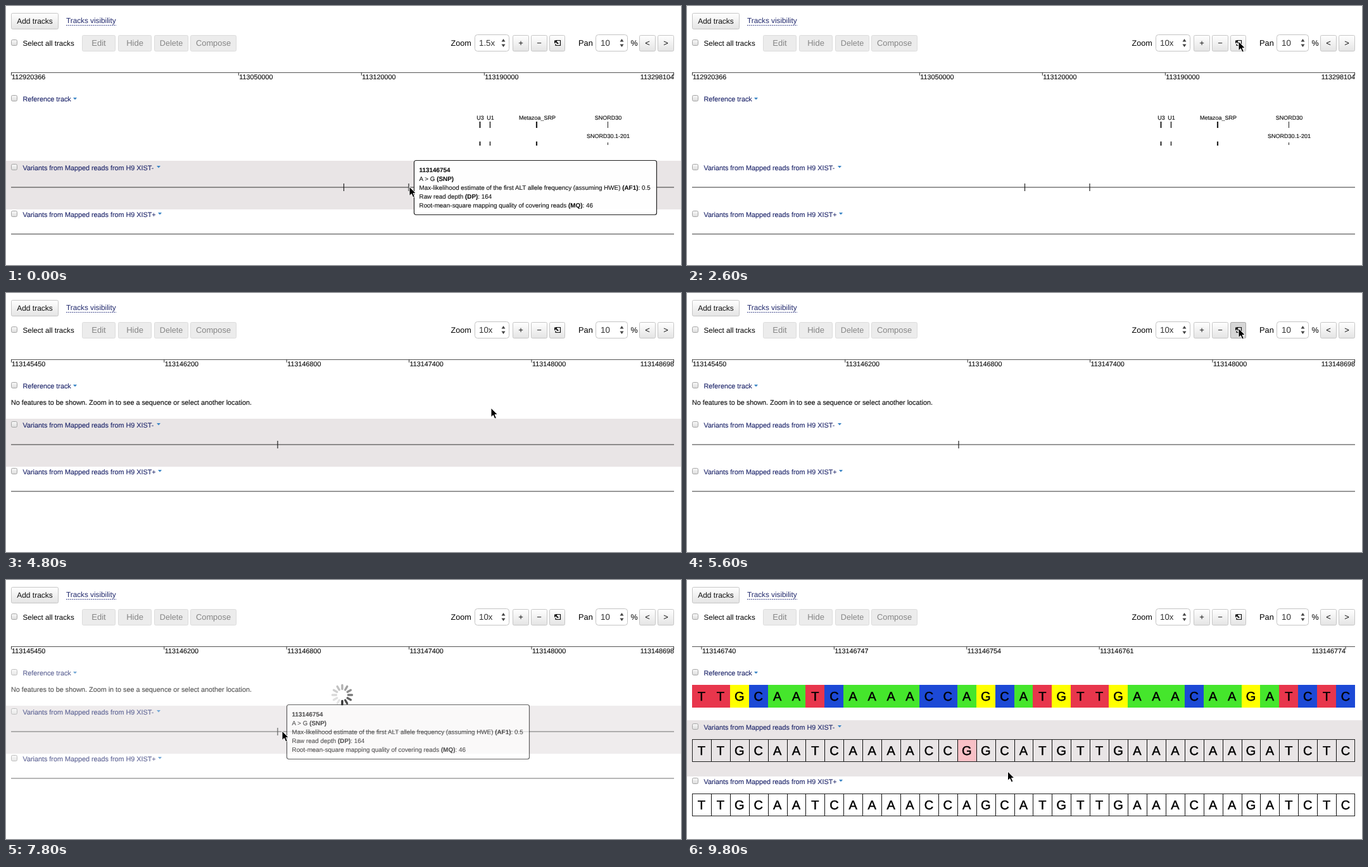
These frames come from a looping animation (1066 by 410 pixels, 10000 ms). An HTML page:

```html
<!DOCTYPE html>
<html lang="en">
<head>
<meta charset="utf-8">
<title>Genome browser</title>
<style>
html, body { margin: 0; width: 100%; height: 100%; overflow: hidden; background: #fff; }
svg { display: block; width: 1066px; height: 410px; cursor: default; }
text { font-family: "Liberation Sans", Arial, sans-serif; text-rendering: geometricPrecision; white-space: pre; }
.title { font-size: 10.8px; fill: #20286c; stroke: #20286c; stroke-width: .15; }
.tick { font-size: 10.8px; fill: #111; stroke: #111; stroke-width: .15; }
.gene { font-size: 9px; fill: #111; stroke: #111; stroke-width: .15; text-anchor: middle; }
.base { font-size: 20px; fill: #000; stroke: #000; stroke-width: .5; text-anchor: middle; }
.tip { font-size: 9.9px; fill: #111; stroke: #111; stroke-width: .1; }
</style>
</head>
<body>
<svg id="stage" viewBox="0 0 1066 410">
  <defs>
    <linearGradient id="btn" x2="0" y2="1"><stop stop-color="#fff"/><stop offset="1" stop-color="#e4e4e4"/></linearGradient>
    <linearGradient id="box" x2="0" y2="1"><stop stop-color="#f8f8f8"/><stop offset="1" stop-color="#dcdcdc"/></linearGradient>
    <filter id="shade" x="-20%" y="-20%" width="140%" height="150%"><feDropShadow dx="0" dy="2" stdDeviation="3" flood-opacity=".35"/></filter>
  </defs>
</svg>
<script>
const LEFT = 8, WIDTH = 1047, RIGHT = LEFT + WIDTH, STEP = 200, LOOP = 10000;
const stage = document.getElementById('stage');

const text = (x, y, s, attrs = '') => `<text x="${x}" y="${y}" ${attrs}>${s}</text>`;
const rect = (x, y, w, h, attrs = '') => `<rect x="${x}" y="${y}" width="${w}" height="${h}" ${attrs}/>`;
const line = (x1, y1, x2, y2, color = '#222', w = 1) =>
  `<path d="M${x1} ${y1}L${x2} ${y2}" stroke="${color}" stroke-width="${w}"/>`;
const group = (id, body, attrs = '') => `<g id="${id}" ${attrs}>${body}</g>`;
const check = y => rect(8.5, y - 4.5, 9, 9, 'rx="2" fill="url(#box)" stroke="#a5a5a5"');
const caret = (x, y) => `<path d="M${x - 3} ${y - 2}h6l-3 3.6z" fill="#3b86c6"/>`;

/* toolbar */
function button(x, y, w, label, size, on = true) {
  const look = on ? 'fill="url(#btn)" stroke="#c6c6c6"' : 'fill="#ececec" stroke="#dcdcdc"';
  return rect(x + .5, y + .5, w - 1, 25, `rx="2" ${look}`) +
    text(x + w / 2, y + 17, label, `font-size="${size}" text-anchor="middle" fill="${on ? '#111' : '#868686'}"`);
}
function select(x, w, label) {
  const ax = x + w - 9.5;
  return rect(x + .5, 45.5, w - 1, 26, 'rx="4" fill="#fff" stroke="#c4c4c4"') + label +
    `<path d="M${ax - 3} 56.5h6l-3 -4.5zM${ax - 3} 60.5h6l-3 4.5z" fill="#444"/>`;
}
const toolbar =
  button(8, 11, 75, 'Add tracks', 12) +
  text(95, 26.9, 'Tracks visibility', 'font-size="11.75" fill="#20286c"') +
  `<path d="M95 30.5H174" stroke="#4a5292" stroke-dasharray="2 1"/>` +
  check(58) + text(26.5, 63, 'Select all tracks', 'font-size="11.6"') +
  button(120, 46, 53, 'Edit', 13, false) + button(177, 46, 53, 'Hide', 13, false) +
  button(234, 46, 54, 'Delete', 12.6, false) + button(291, 46, 73, 'Compose', 12.9, false) +
  text(702.5, 63, 'Zoom', 'font-size="12.6"') +
  select(740, 55, text(747, 62.5, '', 'id="zoom" font-size="13.3" fill="#333"')) +
  button(800, 46, 26, '+', 13) + button(829, 46, 26, '−', 13) + button(858, 46, 25, '', 13) +
  rect(858.5, 46.5, 24, 25, 'id="pressed" rx="2" fill="#d6d6d6" stroke="#a8a8a8"') +
  `<path d="M868 54.5H875.5V62.5H868V60" fill="none" stroke="#111" stroke-width="1.2"/>
   <path d="M866 54.5H871L869.6 56 872.8 59.2 871.4 60.6 868.2 57.4 866 59.5Z" fill="#111"/>` +
  text(904, 63, 'Pan', 'font-size="12.8"') +
  select(931, 51, text(939, 62.5, '10', 'font-size="13.3" fill="#333"')) +
  text(986.5, 63, '%', 'font-size="12.6"') +
  button(1000, 46, 26, '&lt;', 13) + button(1029, 46, 26, '&gt;', 13);

/* tracks */
function ruler(id, lo, hi, marks) {
  const labels = marks.map((v, i) => {
    const x = LEFT + (v - lo) / (hi - lo) * WIDTH, last = i === marks.length - 1;
    const tx = Math.min(Math.max(x, 8.5), RIGHT - .5);
    return line(tx, 105, tx, 110, '#333') +
      text(last ? x : x + 1, 116, v, `class="tick" ${last ? 'text-anchor="end"' : ''}`);
  });
  return group(id, labels.join(''));
}
const NAMES = ['XIST-', 'XIST+'];
const heading = (y, i) => check(y - 1) +
  text(26.5, y + 4, 'Variants from Mapped reads from H9 ' + NAMES[i], 'class="title"') + caret(241 + 2 * i, y - 1);
const shadeRow = (id, y, h) => rect(0, y, 1066, h, `id="${id}" fill="#e9e5e6"`);
const axis = y => line(LEFT, y, RIGHT, y, '#333', 1.2);
const snp = (x, y) => line(x, y - 6, x, y + 6, '#222', 1.2);

function genes() {
  const list = [['U3', 749, 748.5, 2], ['U1', 765, 764.5, 1.5], ['Metazoa_SRP', 839, 838, 2.2], ['SNORD30', 951, 950.5, 1]];
  return list.map(([name, tx, x, w]) => text(tx, 179.5, name, 'class="gene"') +
    line(x, 183, x, 193, '#222', w) + line(x, w > 1 ? 214.5 : 216, x, w > 1 ? 221 : 220, '#222', w)).join('') +
    text(951, 209, 'SNORD30.1-201', 'class="gene"');
}
const wide = group('wide', shadeRow('wideRow', 245, 77) + genes() +
  heading(256, 0) + axis(287) + snp(533.5, 287) + snp(636, 287) + heading(330, 1) + axis(361));

const near = group('near', shadeRow('nearRow', 199, 76) +
  text(8, 177, 'No features to be shown. Zoom in to see a sequence or select another location.', 'class="tick"') +
  heading(209, 0) + axis(240) + snp(429, 240) + heading(283, 1) + axis(314));

const SEQ = 'TTGCAATCAAAACCAGCATGTTGAAACAAGATCTC';
const PAINT = { T: '#e8364c', G: '#ffff00', C: '#1c49d6', A: '#45e62c' };
const CELL = WIDTH / SEQ.length;
function bases(seq, y, paint, edge) {
  return [...seq].map((c, i) => {
    const x = LEFT + i * CELL, side = Math.round(x) + .5;
    return rect(x, y, CELL, 36, `fill="${paint(c, i)}" shape-rendering="crispEdges"`) +
      (i && edge ? line(side, y, side, y + 36, '#111') : '') +
      text(x + CELL / 2, y + 24.6, c, 'class="base"');
  }).join('') + (edge ? rect(8.5, y + .5, WIDTH - 1, 35, 'fill="none" stroke="#222"') : '');
}
const MUTANT = SEQ.slice(0, 14) + 'G' + SEQ.slice(15);
const close = group('close', shadeRow('closeRow', 222, 89) +
  bases(SEQ, 166, c => PAINT[c], false) +
  heading(233, 0) + bases(MUTANT, 252, (c, i) => i === 14 ? '#f8c0c6' : 'none', true) +
  heading(319, 1) + bases(SEQ, 338, () => 'none', true));

/* overlays */
const bold = s => `<tspan font-weight="bold">${s}</tspan>`;
const tipLines = [
  bold('113146754'), 'A &gt; G ' + bold('(SNP)'),
  'Max-likelihood estimate of the first ALT allele frequency (assuming HWE) ' + bold('(AF1)') + ': 0.5',
  'Raw read depth ' + bold('(DP)') + ': 164',
  'Root-mean-square mapping quality of covering reads ' + bold('(MQ)') + ': 46'
];
const tip = group('tip', rect(.5, .5, 383, 86, 'rx="3" fill="#fff" fill-opacity=".95" stroke="#222" stroke-width="1.2"') +
  tipLines.map((s, i) => text(8.5, 18.7 + 14 * i, s, 'class="tip"')).join(''));

const spokes = Array.from({ length: 12 }, (_, i) =>
  `<path d="M0 -9.5V-15.5" transform="rotate(${i * 30})" stroke="#000" stroke-opacity="${(.1 + .7 * (i / 11) ** 1.6).toFixed(2)}" stroke-width="3.4" stroke-linecap="round"/>`).join('');

const menu = group('menu',
  rect(729, 43, 68, 61, 'rx="5" fill="#fff" stroke="#cfcfcf" stroke-width=".6" filter="url(#shade)"') +
  `<path d="M768 44.5H794.5Q796.5 44.5 796.5 47V70Q796.5 72.5 794 72.5H741" fill="none" stroke="#a9c6ec" stroke-width="1.6" opacity=".7"/>
   <path d="M735 58.5L738 61.5 743.5 53" fill="none" stroke="#222" stroke-width="1.8"/>` +
  ['1.5x', '5x', '10x'].map((s, i) => text(750, 61.5 + 17 * i, s, 'font-size="12.6" fill="#222"')).join(''));

const arrow = `<path id="arrow" d="M0 0V14.5L3.4 11.4 5.8 17 8.4 15.9 6 10.5H10.4Z" fill="#000" stroke="#fff"/>`;
const beam = `<path id="beam" d="M-3 -7.5Q0 -7.5 0 -5.5Q0 -7.5 3 -7.5M0 -5.5V6M-3 8Q0 8 0 6Q0 8 3 8M-1.5 2H1.5" fill="none" stroke="#111" stroke-width="1.3"/>`;

stage.insertAdjacentHTML('beforeend', toolbar + line(LEFT, 105.5, RIGHT, 105.5, '#555') +
  ruler('wideRuler', 112920366, 113298104, [112920366, 113050000, 113120000, 113190000, 113298104]) +
  ruler('nearRuler', 113145450, 113148698, [113145450, 113146200, 113146800, 113147400, 113148000, 113148698]) +
  ruler('closeRuler', 113146739.5, 113146774.5, [113146740, 113146747, 113146754, 113146761, 113146774]) +
  group('tracks', wide + near + close + check(146) + text(26.5, 151, 'Reference track', 'class="title"') + caret(109, 147)) +
  rect(0, 106, 1, 304, 'id="band" fill="#eee" fill-opacity=".85" stroke="#707070"') +
  group('spin', spokes) + tip + menu + group('cursor', arrow + beam));

/* motion */
const PATH = [
  [0, 637, 286], [200, 637, 286], [400, 650, 240], [800, 730, 110], [1200, 767, 58], [1400, 767, 58],
  [1800, 778, 88], [2000, 778, 88], [2600, 871, 56], [2800, 871, 56], [3400, 633, 283], [3600, 638, 283],
  [3800, 641, 283], [4200, 642, 281], [4400, 650, 270], [4800, 766, 182], [5200, 868, 58], [5600, 871, 56],
  [6400, 426, 239], [6600, 424, 239], [7200, 435, 239], [7400, 436, 239], [8400, 436, 239], [9800, 506.5, 303]
];
function pointer(t) {
  const i = Math.max(1, PATH.findIndex(p => p[0] >= t));
  const [t0, x0, y0] = PATH[i - 1], [t1, x1, y1] = PATH[i];
  const k = (t - t0) / (t1 - t0);
  return [x0 + (x1 - x0) * k, y0 + (y1 - y0) * k];
}

const el = {};
stage.querySelectorAll('[id]').forEach(e => el[e.id] = e);
const show = (id, on) => el[id].style.display = on ? '' : 'none';
const move = (id, x, y, extra = '') => el[id].setAttribute('transform', `translate(${x} ${y}) ${extra}`);
const within = (t, a, b) => t >= a && t <= b;

function draw(t) {
  const [x, y] = pointer(t);
  const view = t < 4400 ? 'wide' : t < 8200 ? 'near' : 'close';
  for (const v of ['wide', 'near', 'close']) {
    show(v, v === view);
    show(v + 'Ruler', v === view);
  }
  show('wideRow', t <= 200);
  show('nearRow', t <= 4800 || t >= 6400);

  const first = within(t, 2800, 3600), second = within(t, 5600, 7200);
  const selecting = first || second, over = y > 106;
  const start = first && t >= 3400 ? 633 : second && t >= 6600 ? 424 : x;
  show('pressed', selecting);
  show('band', selecting && over);
  el.band.setAttribute('x', start - .5 + (second ? 1 : 0));
  el.band.setAttribute('width', Math.max(.5, x - start));

  const loading = within(t, 3800, 4200) || within(t, 7400, 8000);
  const fade = loading ? .7 : 1;
  el.tracks.setAttribute('opacity', fade);
  show('spin', loading);
  move('spin', 531, 182, `rotate(${210 + (t - 7800) / STEP * 60})`);

  const tipOn = t <= 200 || within(t, 6600, 8000);
  show('tip', tipOn);
  el.tip.setAttribute('opacity', fade);
  move('tip', Math.round(x) + 7, Math.round(y) - 42);

  show('menu', within(t, 1400, 1800));
  el.menu.setAttribute('opacity', t === 1800 ? .93 : 1);
  el.zoom.textContent = t < 2000 ? '1.5x' : '10x';

  const caretMode = selecting && over && !tipOn;
  show('arrow', !caretMode);
  show('beam', caretMode);
  move('cursor', x, y);
}

const begin = performance.now();
let last = -1;
function tick() {
  const t = Math.floor(((performance.now() - begin) % LOOP) / STEP) * STEP;
  if (t !== last) draw(last = t);
  requestAnimationFrame(tick);
}
tick();
</script>
</body>
</html>
```
